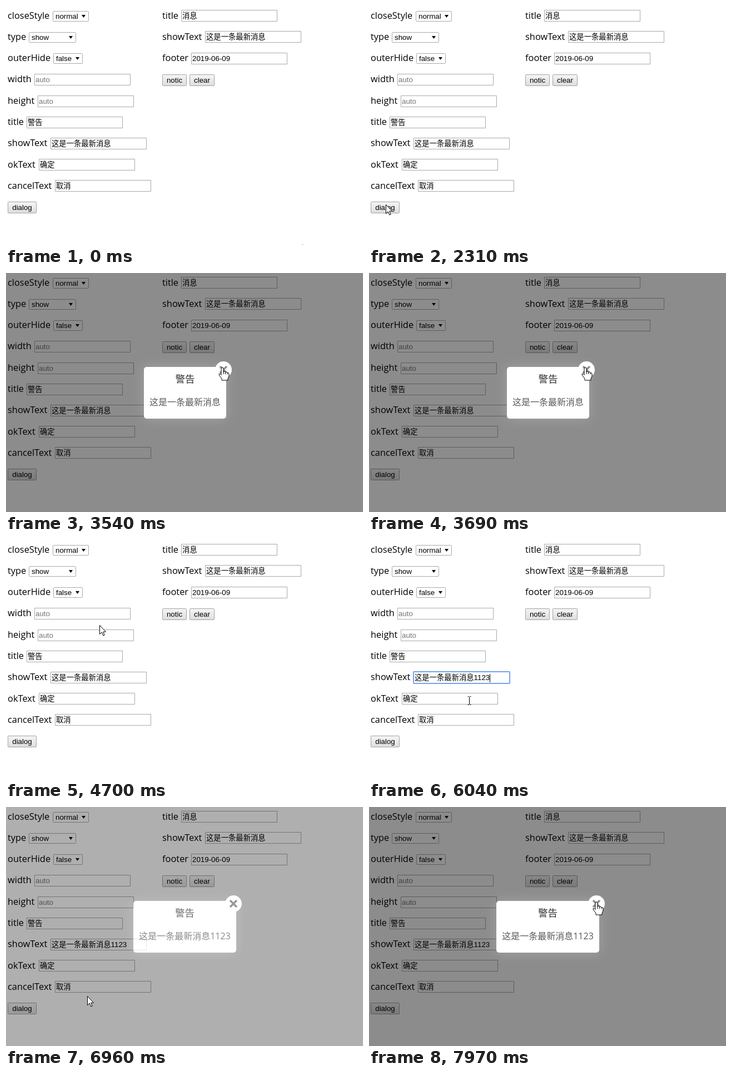
An HTML page with a canvas for the animation above (8000 ms loop, 642 px wide and 430 px high).

```html
<!DOCTYPE html>
<html lang="zh">
<head>
<meta charset="utf-8">
<title>dialog</title>
<style>
html, body { margin: 0; width: 642px; height: 430px; overflow: hidden; background: #fff; }
canvas { display: block; }
</style>
</head>
<body>
<canvas id="stage" width="642" height="430"></canvas>
<script>
const W = 642, H = 430, LOOP = 8000, TICK = 77.4;
const ctx = document.getElementById('stage').getContext('2d');
const layer = document.createElement('canvas');
layer.width = W;
layer.height = H;
const lay = layer.getContext('2d');

const CJK = '"Noto Sans CJK SC", "Noto Sans CJK", sans-serif';
const LABEL = '16.4px "Open Sans", ' + CJK;
const FIELD = '13.333px "Liberation Sans", ' + CJK;
const MSG = '这是一条最新消息';

// label, label x, baseline, field x, field y, value
const inputs = [
  ['width', 3, 137, 51, 122, ''],
  ['height', 3, 176, 57, 161, ''],
  ['title', 3, 214, 37, 199, '警告'],
  ['showText', 3, 252, 80, 237, MSG],
  ['okText', 3, 291, 59, 275, '确定'],
  ['cancelText', 3, 329, 88, 313, '取消'],
  ['title', 281, 23, 315, 7, '消息'],
  ['showText', 281, 61, 358, 45, MSG],
  ['footer', 281, 99, 333, 84, '2019-06-09']
];
// label, baseline, x, y, width, value
const selects = [
  ['closeStyle', 23, 84, 9, 65, 'normal'],
  ['type', 61, 41, 47, 85, 'show'],
  ['outerHide', 99, 85, 85, 53, 'false']
];
const buttons = [['dialog', 3, 352, 52], ['notic', 281, 123, 44], ['clear', 330, 123, 45]];

const dialogs = [
  { from: 2540, to: 3640, x: 248, w: 148, text: MSG },
  { from: 6760, to: Infinity, x: 229, w: 185, text: MSG + '1123' }
];

// pointer path: time, x, y
const path = [
  [0, 533, 429], [60, 533, 429], [400, 260, 190], [700, 86, 14], [840, 116, 2],
  [1300, 116, 2], [1380, 112, 13], [1530, 112, 13], [1840, 29, 334], [1980, 29, 334],
  [2080, 30, 357], [2700, 30, 357], [2850, 80, 330], [3200, 300, 215], [3480, 389, 170],
  [3680, 389, 170], [4150, 104, 12], [4300, 104, 12], [4690, 177, 172], [5090, 200, 250],
  [5160, 200, 250], [5240, 200, 256], [5780, 200, 256], [6020, 180, 289], [6120, 180, 289],
  [6300, 60, 350], [6560, 40, 367], [6740, 40, 367], [6950, 138, 344], [7430, 378, 228],
  [7500, 378, 228], [7940, 409, 171], [8000, 409, 171]
];

function text(c, s, x, y, font, color = '#000', align = 'left') {
  c.font = font;
  c.fillStyle = color;
  c.textAlign = align;
  c.fillText(s, x, y);
}

function box(x, y, w, h, fill, stroke, r = 0) {
  ctx.beginPath();
  ctx.roundRect(x + .5, y + .5, w - 1, h - 1, r);
  ctx.fillStyle = fill;
  ctx.fill();
  ctx.strokeStyle = stroke;
  ctx.lineWidth = 1;
  ctx.stroke();
}

function pointerAt(t) {
  const i = Math.max(1, path.findIndex(p => p[0] > t));
  const [t0, x0, y0] = path[i - 1], [t1, x1, y1] = path[i];
  const k = (t - t0) / (t1 - t0);
  return [Math.round(x0 + (x1 - x0) * k), Math.round(y0 + (y1 - y0) * k)];
}

// CSS "ease": cubic-bezier(.25, .1, .25, 1)
function ease(x) {
  if (x <= 0) return 0;
  if (x >= 1) return 1;
  let lo = 0, hi = 1, u = .5;
  for (let i = 0; i < 20; i++) {
    u = (lo + hi) / 2;
    if (.75 * u * (1 - u) + u * u * u < x) lo = u; else hi = u;
  }
  return .3 * u * (1 - u) ** 2 + 3 * u * u * (1 - u) + u ** 3;
}

function drawForm(t) {
  const typed = t < 5400 ? '' : t < 5780 ? '112' : '1123';
  const focus = t >= 5150 && t < 6640;

  inputs.forEach(([name, lx, base, x, y, value], i) => {
    const active = i === 3 && focus;
    text(ctx, name, lx, base, LABEL);
    if (active) box(x - 1, y - 1, 175, 23, '#9dbff5', '#6d9df0', 1);
    box(x, y, 173, 21, '#fff', active ? '#7aa7f2' : '#a9a9a9');
    const s = i === 3 ? value + typed : value;
    text(ctx, s || 'auto', x + 2, y + 15, FIELD, s ? '#000' : '#757575');
    if (active && t >= 5230) {
      ctx.fillRect(Math.round(x + 2 + ctx.measureText(s).width), y + 4, 1, 15);
    }
  });

  for (const [name, base, x, y, w, value] of selects) {
    text(ctx, name, 3, base, LABEL);
    box(x, y, w, 19, '#fff', '#a9a9a9', 1);
    text(ctx, value, x + 5, y + 14, FIELD);
    ctx.beginPath();
    ctx.moveTo(x + w - 13, y + 7);
    ctx.lineTo(x + w - 6, y + 7);
    ctx.lineTo(x + w - 9.5, y + 12);
    ctx.fill();
  }

  for (const [name, x, y, w] of buttons) {
    const g = ctx.createLinearGradient(0, y, 0, y + 21);
    g.addColorStop(0, '#f6f6f6');
    g.addColorStop(1, '#dddddd');
    box(x, y, w, 21, g, '#a3a3a3', 1);
    text(ctx, name, x + w / 2, y + 15, FIELD, '#000', 'center');
  }

  if (t >= 1300 && t < 1530) drawOptions();
}

function drawOptions() {
  box(84, 28, 65, 52, '#fff', '#8a8a8a');
  ctx.fillStyle = '#1e90ff';
  ctx.fillRect(85, 29, 63, 17);
  ['normal', 'circle', 'none'].forEach((s, i) =>
    text(ctx, s, 89, 42 + i * 17, FIELD, i ? '#000' : '#fff'));
}

function drawDialog({ x, w, text: msg }, alpha, hover) {
  const mid = x + w / 2, cx = x + w - 5, cy = 174;
  lay.clearRect(0, 0, W, H);
  lay.fillStyle = 'rgba(0,0,0,.45)';
  lay.fillRect(0, 0, W, H);

  lay.save();
  lay.shadowColor = 'rgba(255,255,255,.2)';
  lay.shadowBlur = 20;
  lay.fillStyle = '#fff';
  lay.beginPath();
  lay.roundRect(x, 169, w, 93, 5);
  lay.fill();
  lay.restore();

  text(lay, '警告', mid, 197, '17.6px "Open Sans", ' + CJK, '#333', 'center');
  text(lay, msg, mid, 238, '16px "Open Sans", ' + CJK, '#595959', 'center');

  lay.fillStyle = '#fff';
  lay.beginPath();
  lay.arc(cx, cy, 15, 0, 7);
  lay.fill();
  lay.strokeStyle = hover ? '#8f8f8f' : '#6c6c6c';
  lay.lineWidth = 3.6;
  lay.beginPath();
  for (const d of [-6, 6]) {
    lay.moveTo(cx - 6, cy - d);
    lay.lineTo(cx + 6, cy + d);
  }
  lay.stroke();

  ctx.globalAlpha = alpha;
  ctx.drawImage(layer, 0, 0);
  ctx.globalAlpha = 1;
}

const shapes = {
  arrow: new Path2D('M.5 .5V16.5L4.2 13L6.8 19L9.2 18L6.7 12.2H11.5Z'),
  hand: new Path2D('M-2 2Q-2 0 0 0Q2 0 2 2V7.5Q5 6.5 5.5 8.5Q8.5 7.5 9 9.5Q12 9 12 12V16' +
    'L10 20V23H-1V20L-5.5 14Q-7 11 -4.5 11L-2 13.5Z'),
  detail: new Path2D('M2 7V12M5.5 8.5V12M9 9.5V12.5'),
  beam: new Path2D('M-3 -7.5H-1M1 -7.5H3M0 -7V7M-3 7.5H-1M1 7.5H3')
};

function drawPointer(x, y, kind) {
  ctx.save();
  ctx.translate(x, y);
  ctx.lineWidth = 1;
  ctx.fillStyle = '#fff';
  ctx.strokeStyle = '#000';
  if (kind === 'beam') {
    ctx.translate(.5, 0);
    ctx.stroke(shapes.beam);
  } else {
    ctx.fill(shapes[kind]);
    ctx.stroke(shapes[kind]);
    if (kind === 'hand') ctx.stroke(shapes.detail);
  }
  ctx.restore();
}

function render(now) {
  const t = Math.floor((now % LOOP + 15) / TICK) * TICK;
  const [x, y] = pointerAt(t);
  let kind = 'arrow';

  ctx.fillStyle = '#fff';
  ctx.fillRect(0, 0, W, H);
  drawForm(t);

  if (inputs.some(f => x >= f[3] && x < f[3] + 173 && y >= f[4] && y < f[4] + 21)) kind = 'beam';
  for (const d of dialogs) {
    const alpha = t < d.to ? ease((t - d.from) / 500) : 1 - ease((t - d.to) / 500);
    if (alpha <= 0) continue;
    const hover = Math.hypot(x - d.x - d.w + 5, y - 174) < 15;
    kind = hover ? 'hand' : 'arrow';
    drawDialog(d, alpha, hover);
  }

  const typing = t >= 5400 && t < 5780;
  if (!typing) drawPointer(x, y, kind);
}

const start = performance.now();
function loop() {
  render(performance.now() - start);
  requestAnimationFrame(loop);
}
loop();
</script>
</body>
</html>
```
